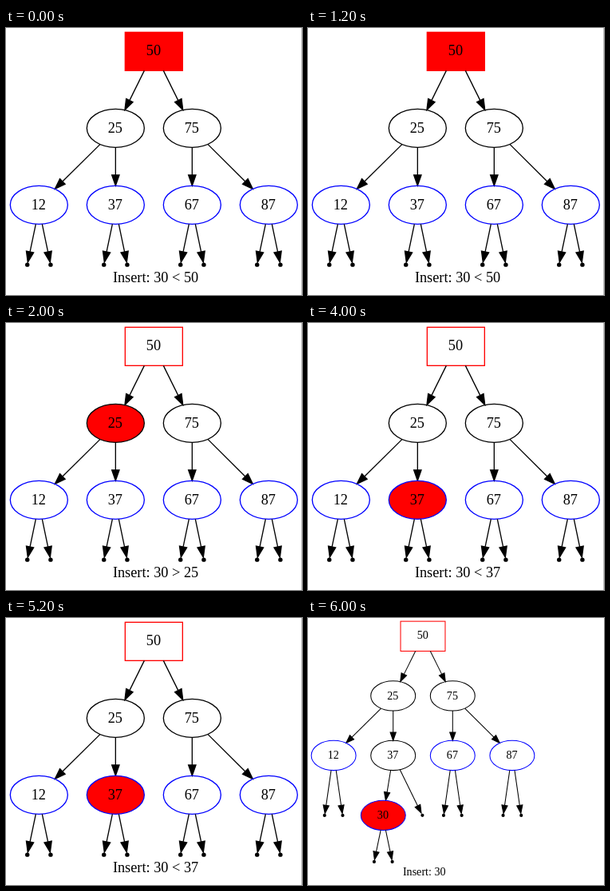
An HTML page that plays this animation: 371x334 px, repeating every 8 s.

```html
<!DOCTYPE html>
<html lang="en">
<head>
<meta charset="utf-8">
<title>Binary tree insert</title>
<style>
html, body { margin: 0; width: 100%; height: 100%; overflow: hidden; background: #fff; }
svg { display: block; width: 371px; height: 334px; }
text { font-family: "Liberation Serif", "Times New Roman", serif; text-anchor: middle; fill: #000; }
</style>
</head>
<body>
<svg id="stage" viewBox="0 0 371 334"></svg>
<script>
const STEP = 2000;
const BLACK = '#000', BLUE = '#00f', RED = '#f00';
const stage = document.getElementById('stage');

function add(parent, tag, attrs, label) {
  const el = document.createElementNS('http://www.w3.org/2000/svg', tag);
  for (const k in attrs) el.setAttribute(k, attrs[k]);
  if (label) el.textContent = label;
  parent.append(el);
  return el;
}

// Line with a filled arrowhead whose tip is at (x2, y2)
function arrow(g, x1, y1, x2, y2) {
  const d = Math.hypot(x2 - x1, y2 - y1);
  const ux = (x2 - x1) / d, uy = (y2 - y1) / d;
  const bx = x2 - ux * 13.33, by = y2 - uy * 13.33, w = 4.67;
  add(g, 'path', { d: `M${x1} ${y1}L${bx} ${by}`, stroke: BLACK });
  add(g, 'path', {
    d: `M${x2} ${y2}L${bx - uy * w} ${by + ux * w}L${bx + uy * w} ${by - ux * w}Z`,
    fill: BLACK, stroke: BLACK
  });
}

function dot(g, x, y) {
  add(g, 'circle', { cx: x, cy: y, r: 2.7, fill: BLACK });
}

// Two empty children, drop units below a node
function stubs(g, x, y, drop) {
  for (const s of [-1, 1]) {
    arrow(g, x + s * 4, y + 24, x + s * 14, y + drop - 3);
    dot(g, x + s * 14.6, y + drop);
  }
}

function text(g, x, y, label) {
  add(g, 'text', { x, y }, label);
}

function node(g, x, y, label, stroke, hot) {
  add(g, 'ellipse', { cx: x, cy: y, rx: 36, ry: 24, stroke, fill: hot ? RED : 'none' });
  text(g, x - 0.5, y + 5.7, label);
}

// drop: distance from the leaves to their empty children
function tree(hot, drop, scale, size) {
  const g = add(stage, 'g', {
    transform: `scale(${scale}) translate(.33 .33)`,
    fill: 'none', 'stroke-width': 1.33, visibility: 'hidden'
  });
  g.style.fontSize = size / scale + 'px';
  add(g, 'rect', {
    x: 149, y: 5, width: 72, height: 48, stroke: RED, fill: hot === 50 ? RED : 'none'
  });
  arrow(g, 173, 53, 148.6, 102.2);
  arrow(g, 197, 53, 221.4, 102.2);
  arrow(g, 117.5, 145.3, 61, 201);
  arrow(g, 137, 149, 137, 197);
  arrow(g, 233, 149, 233, 197);
  arrow(g, 252.8, 145.3, 309, 201);
  text(g, 184.6, 33.7, '50');
  node(g, 137, 125, '25', BLACK, hot === 25);
  node(g, 233, 125, '75', BLACK);
  [[41, '12'], [233, '67'], [329, '87']].forEach(([x, label]) => {
    node(g, x, 221, label, BLUE);
    stubs(g, x, 221, drop);
  });
  return g;
}

function search(hot, sign) {
  const g = tree(hot, 74.8, 1, 18.3);
  node(g, 137, 221, '37', BLUE, hot === 37);
  stubs(g, 137, 221, 74.8);
  text(g, 187.2, 317.7, `Insert: 30 ${sign} ${hot}`);
  add(g, 'path', { d: 'M370.17 -1V335', stroke: '#c0c0c0', 'stroke-width': 1 });
  return g;
}

function inserted() {
  const g = tree(30, 96.5, 0.777, 14.1);
  node(g, 137, 221, '37', BLACK);
  arrow(g, 133, 245, 125, 293.5);
  arrow(g, 148, 244, 182.5, 314);
  dot(g, 184.2, 317.3);
  node(g, 121, 317.3, '30', BLUE, true);
  stubs(g, 121, 317.3, 74.8);
  text(g, 187.2, 414.2, 'Insert: 30');
  return g;
}

const scenes = [search(50, '<'), search(25, '>'), search(37, '<'), inserted()];
const start = performance.now();

function draw() {
  const t = Math.max(0, performance.now() - start);
  const now = Math.floor(t / STEP) % scenes.length;
  scenes.forEach((g, i) => g.setAttribute('visibility', i === now ? 'visible' : 'hidden'));
  requestAnimationFrame(draw);
}
draw();
</script>
</body>
</html>
```
